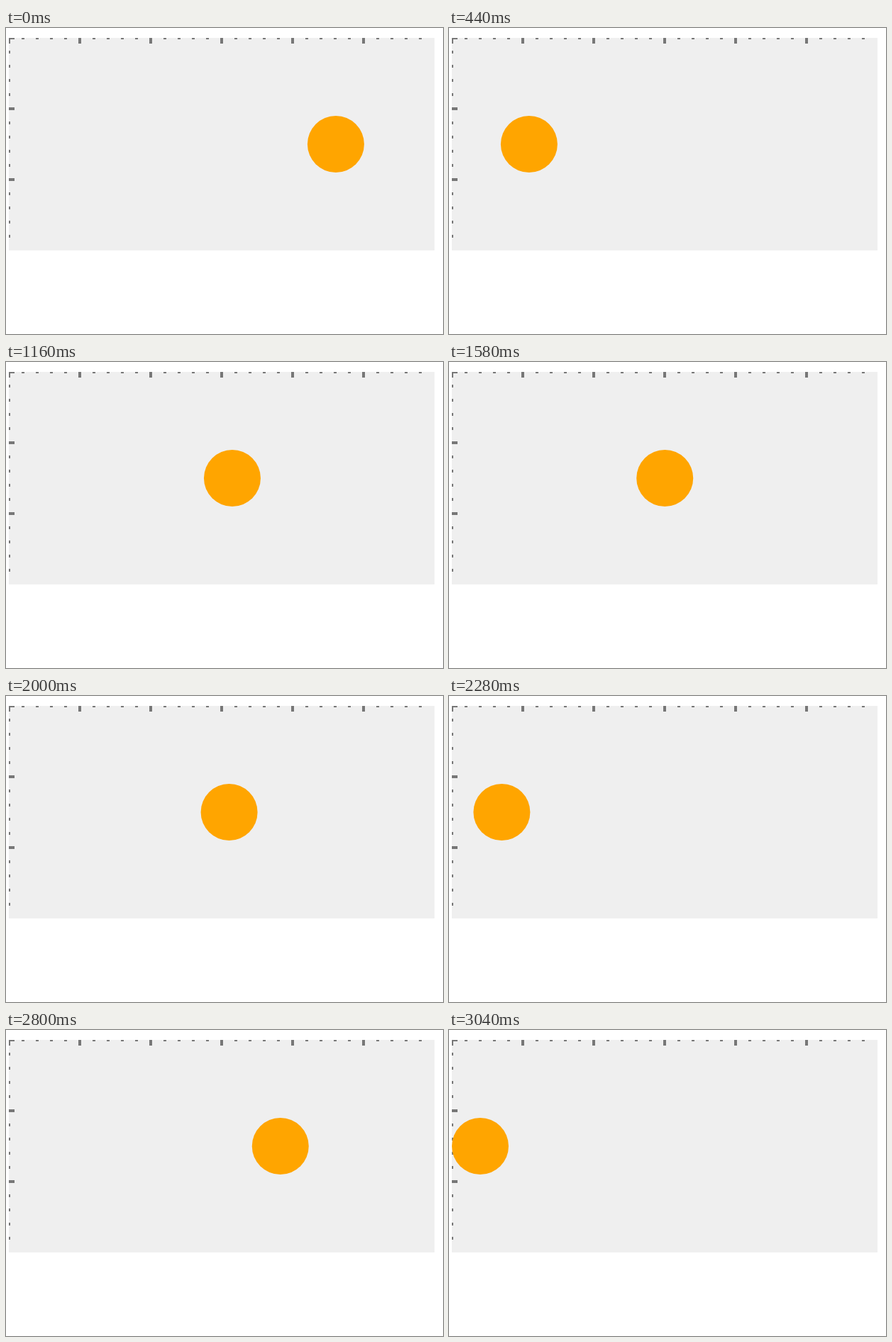
Recreate the animation shown at these times as an HTML page with a canvas. Size 616 px wide and 432 px high, loop 3.06 s.

```html
<!DOCTYPE html>
<html lang="en">
<head>
<meta charset="utf-8">
<title>Oscillating ball</title>
<style>
  html, body { margin: 0; width: 100%; height: 100%; overflow: hidden; background: #fff; }
  canvas { position: absolute; left: 4px; top: 14px; }
</style>
</head>
<body>
<canvas id="stage" width="600" height="300"></canvas>
<script>
const canvas = document.getElementById('stage');
const ctx = canvas.getContext('2d');
const W = canvas.width, H = canvas.height;
const LOOP = 3060, FRAME = 20;

function drawRulers() {
  ctx.fillStyle = '#777';
  const size = i => (i % 100 ? 2 : 8);
  for (let x = 0; x < W; x += 20) ctx.fillRect(x - 2, 0, 4, size(x));
  for (let y = 0; y < H; y += 20) ctx.fillRect(0, y - 2, size(y), 4);
}

// The angle grows in whole steps of 0.1 rad, about three steps per two frames.
function ballX(ms) {
  const frame = Math.floor((ms % LOOP) / FRAME);
  const step = 258 + Math.floor(1.503 * frame + 0.57);
  return W / 2 + 260 * Math.sin(step * 0.1);
}

function draw(ms) {
  ctx.fillStyle = '#efefef';
  ctx.fillRect(0, 0, W, H);
  drawRulers();
  ctx.fillStyle = '#ffa500';
  ctx.beginPath();
  ctx.arc(ballX(ms), H / 2, 40, 0, Math.PI * 2);
  ctx.fill();
}

const start = performance.now();
function tick() {
  draw(performance.now() - start);
  requestAnimationFrame(tick);
}
draw(0);
requestAnimationFrame(tick);
</script>
</body>
</html>
```
